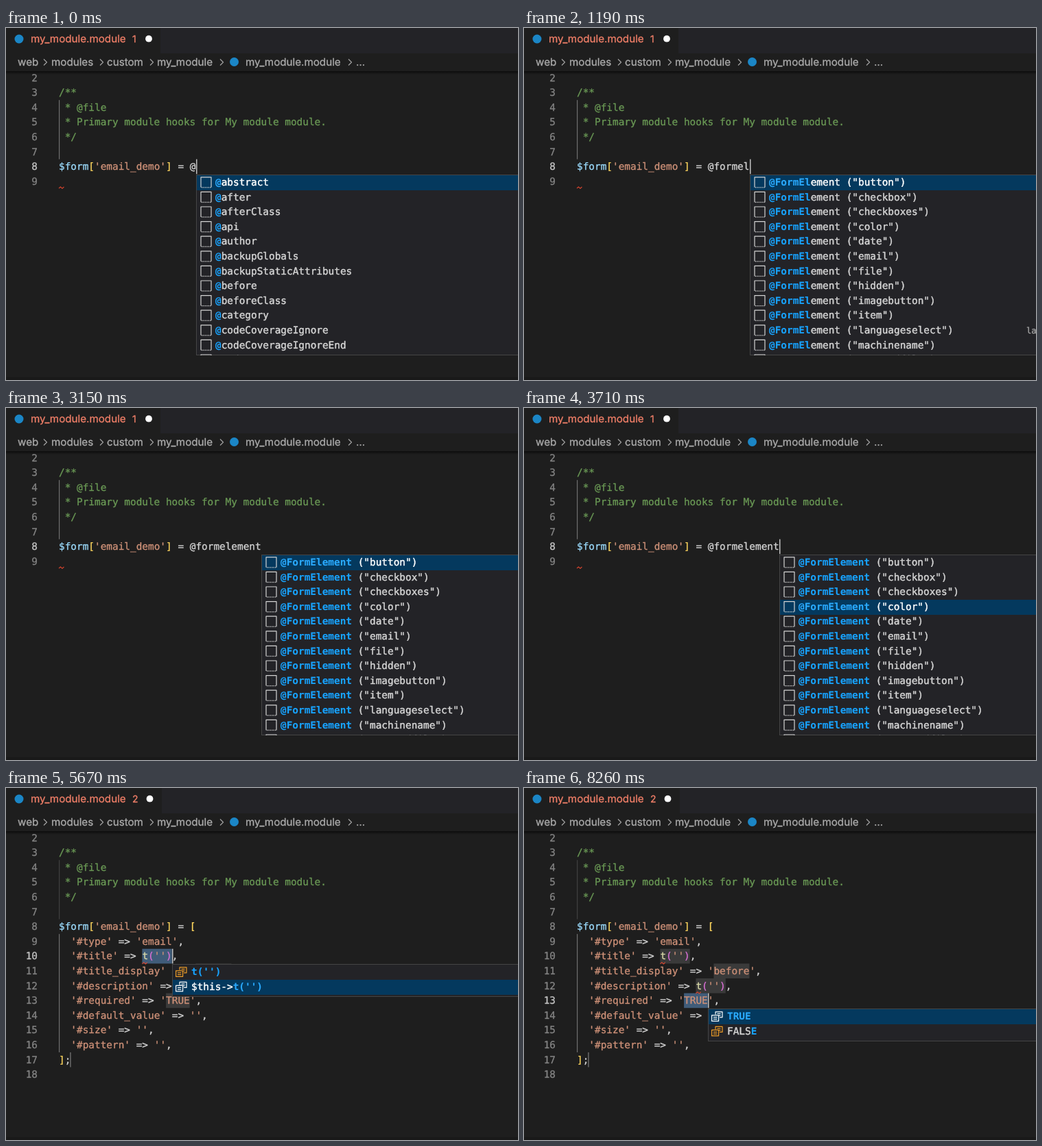
Write an HTML page with a canvas that moves like this. It is 746 by 514 pixels and loops after 8750 ms.

```html
<!DOCTYPE html>
<html lang="en">
<head>
<meta charset="utf-8">
<title>Editor completion demo</title>
<style>
  html, body { margin: 0; width: 100%; height: 100%; overflow: hidden; background: #1e1e1e; }
  canvas { display: block; }
</style>
</head>
<body>
<canvas id="stage" width="746" height="514"></canvas>
<script>
const ctx = document.getElementById('stage').getContext('2d');
const LOOP = 8750, LINE = 21.6, CHAR = 8.67, LEFT = 77;
const MONO = '14.4px "DejaVu Sans Mono", monospace';
const BOLD = 'bold ' + MONO;
const UI = '15.2px Inter, sans-serif';
const PANEL = '#232327';
const TEXT = '#d4d4d4', STRING = '#ce9178', RED = '#dc452e', BLUE = '#18a3ff', FOCUS_BLUE = '#2aaaff';

const KEY_TIMES = [70, 210, 420, 560, 980, 1120, 1260, 1540, 2380, 2450, 2660];
const DOWN_TIMES = [3220, 3430, 3640, 3780, 3920];
const CARET_OFF = [[2030, 2380], [3150, 3640], [4830, 5320], [5810, 6300], [7210, 7490], [7980, 8260]];
const EXPAND = 4200, POPUP = 4270, COLOURED = 4340, CHECKED = 5040;

const COMMENT = ['', '/**', ' * @file', ' * Primary module hooks for My module module.', ' */', ''];
const FIELDS = [
  "  '#type' => 'email',", "  '#title' => t(''),", "  '#title_display' => 'before',",
  "  '#description' => t(''),", "  '#required' => 'TRUE',", "  '#default_value' => '',",
  "  '#size' => '',", "  '#pattern' => '',", '];', ''
];
// In menu labels, [brackets] mark the matched letters.
const TAGS = ['abstract', 'after', 'afterClass', 'api', 'author', 'backupGlobals', 'backupStaticAttributes',
  'before', 'beforeClass', 'category', 'codeCoverageIgnore', 'codeCoverageIgnoreEnd', 'codeCoverageIgnoreStart']
  .map(name => '[@]' + name);
const ELEMENTS = ['button', 'checkbox', 'checkboxes', 'color', 'date', 'email', 'file', 'hidden',
  'imagebutton', 'item', 'languageselect', 'machinename', 'managedfile'];
const T_MENU = ["[t('')]", "$this->[t('')]"];
const STOPS = [
  { line: 10, col: 14, length: 5, menu: T_MENU, start: EXPAND },
  { line: 11, col: 23, length: 6, menu: ['[before]', 'aft[e]r', 'invisibl[e]', 'att[r]ibut[e]'], start: 6720 },
  { line: 12, col: 20, length: 5, menu: T_MENU, start: 7490 },
  { line: 13, col: 18, length: 4, menu: ['[TRUE]', 'FALS[E]'], start: 8260 }
];

const lineTop = n => 191.6 + LINE * (n - 8);
const baseline = n => lineTop(n) + 15.6;
const colX = col => LEFT + CHAR * col;
const caretX = col => Math.round(colX(col) + .7);
const countPassed = (times, t) => times.filter(time => time <= t).length;

function rect(x, y, w, h, color) {
  ctx.fillStyle = color;
  ctx.fillRect(x, y, w, h);
}

// A hairline outline gives the letters their slightly heavy weight.
function text(str, x, y, color, font = MONO, align = 'left', weight = .3) {
  ctx.font = font;
  ctx.fillStyle = ctx.strokeStyle = color;
  ctx.textAlign = align;
  ctx.lineWidth = weight;
  ctx.fillText(str, x, Math.round(y));
  ctx.strokeText(str, x, Math.round(y));
}

function disc(x, y, r, color) {
  ctx.fillStyle = color;
  ctx.beginPath();
  ctx.arc(x, y, r, 0, 2 * Math.PI);
  ctx.fill();
}

function polyline(color, width, ...points) {
  ctx.strokeStyle = color;
  ctx.lineWidth = width;
  ctx.beginPath();
  points.forEach(([x, y]) => ctx.lineTo(x, y));
  ctx.stroke();
}

function squiggle(x, y) {
  polyline(RED, 1.1, [x, y + 3], [x + 2.4, y + .8], [x + 5, y + 3.2], [x + 7.4, y + .8]);
}

function tokenColor(token) {
  if (token[0] === '$') return '#9cdcfe';
  if (token[0] === "'") return STRING;
  if (/^[[\]]$/.test(token)) return '#ffd75e';
  if (/^[()]$/.test(token)) return '#da70d6';
  return token === 't' ? '#dcdcaa' : TEXT;
}

function codeLine(str, n, plain) {
  const y = baseline(n);
  if (/^(\/\*| \*)/.test(str)) return text(str, LEFT, y, '#6a9955');
  let col = 0;
  for (const token of str.split(/(\$\w+|'[^']*'|[[\]()]|\bt(?=\())/)) {
    const color = plain && /^['t]/.test(token) ? TEXT : tokenColor(token);
    text(token, colX(col), y, color);
    col += token.length;
  }
}

function header(errors) {
  const tabEnd = errors > 1 ? 227 : 225;
  rect(tabEnd, 0, 746 - tabEnd, 37, PANEL);
  disc(19, 16, 6.5, '#1b86c6');
  text('my_module.module', 36, 21.3, '#f07f68', UI);
  text(errors, 184, 21, '#f07f68', '14px Inter, sans-serif');
  disc(errors > 1 ? 209.5 : 208, 15.7, 4.9, '#fff');

  const crumbs = [['web', 17], ['modules', 66], ['custom', 147], ['my_module', 220], ['my_module.module', 349], ['…', 510]];
  for (const [label, x] of crumbs) text(label, x, 55.3, '#acacac', UI);
  for (const x of [55, 137, 210, 312, 499]) {
    polyline('#a0a0a0', 1.2, [x, 45.5], [x + 4.5, 50], [x, 54.5]);
  }
  disc(332.5, 49.5, 6.5, '#1b86c6');

  const shade = ctx.createLinearGradient(0, 63, 0, 68);
  shade.addColorStop(0, '#0009');
  shade.addColorStop(1, '#0000');
  rect(0, 63, 746, 5, shade);
}

function snippetIcon(x, y) {
  polyline(TEXT, 1.2, [x, y + 15], [x, y], [x + 15, y], [x + 15, y + 15]);
  for (let dx = 1; dx < 15; dx += 2.4) rect(x + dx, y + 14.4, 1.3, 1.3, TEXT);
}

function enumIcon(x, y, color) {
  polyline(color, 1.2, [x + 6, y + 5], [x + 6, y + 1], [x + 16, y + 1], [x + 16, y + 9], [x + 12, y + 9]);
  polyline(color, 1.2, [x + 8.5, y + 3.7], [x + 13.5, y + 3.7]);
  polyline(color, 1.2, [x + 11, y + 6.3], [x + 13.5, y + 6.3]);
  ctx.strokeRect(x + .6, y + 6, 10, 8.5);
  polyline(color, 1.2, [x + 3, y + 9], [x + 8.4, y + 9]);
  polyline(color, 1.2, [x + 3, y + 11.7], [x + 8.4, y + 11.7]);
}

function menu(line, col, labels, selected, isSnippet) {
  const x = caretX(col), y = Math.round(lineTop(line + 1) + .4);
  const height = Math.round(Math.min(labels.length, 12) * LINE + 4.4);
  ctx.save();
  ctx.beginPath();
  ctx.rect(x, y, 746 - x, height);
  ctx.clip();
  rect(x, y, 746, height, '#454545');
  rect(x + 1, y + 1, 746, height - 2, PANEL);
  labels.forEach((label, i) => {
    const top = y + 1 + i * LINE, focused = i === selected;
    if (focused) rect(x + 1, Math.round(top), 746, 22, '#04395e');
    if (isSnippet) snippetIcon(x + 7, top + 2.8);
    else enumIcon(x + 5, top + 2.8, focused ? '#fff' : '#ee9d28');
    let column = 0;
    label.split(/[[\]]/).forEach((part, k) => {
      const matched = k % 2;
      const color = matched ? (focused ? FOCUS_BLUE : BLUE) : focused ? '#fff' : TEXT;
      const partX = x + 28 + column * CHAR;
      text(part, partX, top + 15, color, matched ? BOLD : MONO, 'left', matched ? .1 : .45);
      column += part.length;
    });
    if (label.includes('languageselect')) {
      text('languageselect', x + 403, top + 15, '#a8a8a8', '12.2px "DejaVu Sans Mono", monospace');
    }
  });
  ctx.restore();
}

function guide(from, to, active) {
  rect(LEFT, lineTop(from), 1.2, LINE * (to - from + 1), active ? '#707070' : '#404040');
}

function draw(t) {
  const expanded = t >= EXPAND, checked = t >= CHECKED;
  const typed = '@' + 'formelement'.slice(0, countPassed(KEY_TIMES, t));
  const active = STOPS.filter(stop => stop.start <= t).pop();
  const caretLine = expanded ? active.line : 8;
  const caretCol = expanded ? active.col + active.length : 22 + typed.length;
  const lines = [...COMMENT, "$form['email_demo'] = " + (expanded ? '[' : typed), ...(expanded ? FIELDS : [''])];

  rect(0, 0, 746, 514, '#1e1e1e');
  rect(0, 510, 746, 4, '#191919');
  guide(4, 7, !expanded);
  if (expanded) {
    guide(9, 16, true);
    for (const stop of STOPS) {
      const box = [colX(stop.col), lineTop(stop.line), stop.length * CHAR, LINE];
      rect(...box, stop === active ? '#405c79' : '#3a3a3a');
    }
    rect(colX(2) - 1, lineTop(17), 1.2, LINE, '#7c7c7c');
  }

  lines.forEach((str, i) => {
    const n = i + 2;
    text(n, 46, baseline(n), n === caretLine ? '#c6c6c6' : '#858585', MONO, 'right');
    codeLine(str, n, n > 8 && t < COLOURED);
  });

  if (!expanded) squiggle(LEFT, lineTop(9) + 18);
  else if (!checked) squiggle(LEFT, lineTop(18) + 19);
  else for (const i of [0, 2]) squiggle(colX(STOPS[i].col), lineTop(STOPS[i].line) + 19);

  header(checked ? 2 : 1);
  if (!CARET_OFF.some(([from, to]) => t >= from && t < to)) {
    rect(caretX(caretCol), lineTop(caretLine), 1.5, LINE, '#c0c0c0');
  }

  if (!expanded) {
    const labels = typed === '@' ? TAGS : ELEMENTS.map(name => {
      const full = '@FormElement';
      return `[${full.slice(0, typed.length)}]${full.slice(typed.length)} ("${name}")`;
    });
    menu(8, caretCol, labels, countPassed(DOWN_TIMES, t), true);
  } else if (t >= POPUP) {
    menu(caretLine, caretCol, active.menu, t >= 5670 && t < 6160 ? 1 : 0, false);
  }
}

ctx.textRendering = 'geometricPrecision';
ctx.lineJoin = 'round';
const begin = performance.now();
function tick() {
  draw((performance.now() - begin) % LOOP);
  requestAnimationFrame(tick);
}
tick();
</script>
</body>
</html>
```
